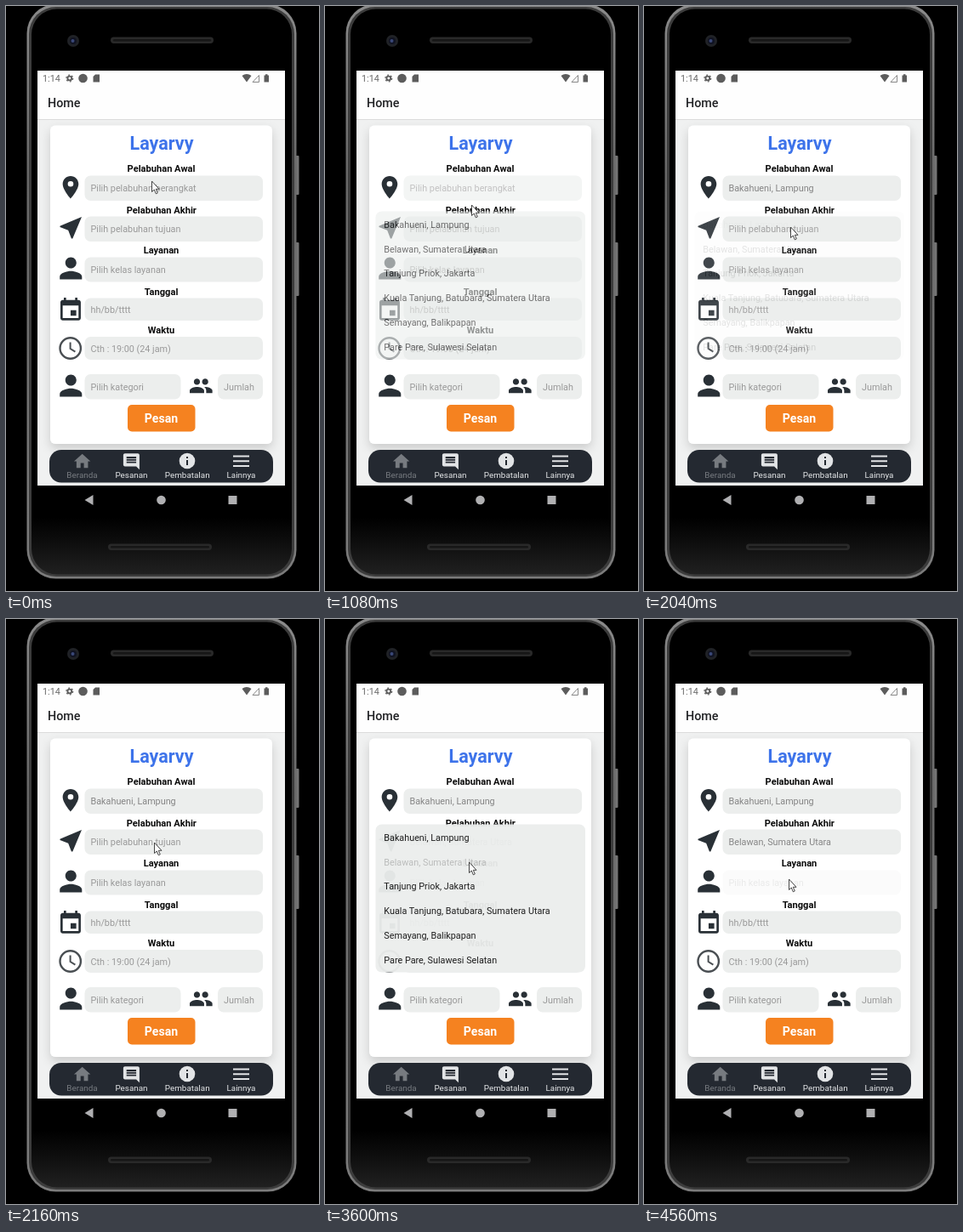
An HTML page that plays this animation: 368 by 688 pixels, repeating every 4800 ms.

```html
<!DOCTYPE html>
<html lang="id">
<head>
<meta charset="utf-8">
<title>Layarvy</title>
<style>
html, body { margin: 0; width: 100%; height: 100%; overflow: hidden; background: #000; }
svg { display: block; width: 368px; height: 688px; font-family: Roboto, "Liberation Sans", sans-serif; }
.mid { text-anchor: middle; }
.label { font-size: 11.1px; font-weight: 700; text-anchor: middle; fill: #0c0c0c; }
.box { fill: #eceeed; }
.hint { font-size: 10.8px; fill: #999; }
.value { font-size: 10.8px; fill: #858585; }
.list text { font-size: 10.8px; fill: #151515; }
.icon { fill: #293036; }
.tab { font-size: 9.9px; fill: #e4e6e8; text-anchor: middle; }
.tabicon { fill: #e2e4e6; }
.off { fill: #777b80; }

/* 2.5% is one 120 ms step */
.anim { animation: 4.8s step-end infinite; }
#cursor { animation-name: cursor; }
#list { animation-name: list; }
#item1 { animation-name: item1; }
#item2 { animation-name: item2; }
#field1 { animation-name: field1; }
#field2 { animation-name: field2; }
#field3 { animation-name: field3; }
#hint1 { animation-name: hide1; }
#value1 { animation-name: show1; }
#hint2 { animation-name: hide2; }
#value2 { animation-name: show2; }

@keyframes cursor {
  0% { transform: translate(171px, 206px); }
  2.5% { transform: translate(172px, 212px); }
  5% { transform: translate(173px, 218px); }
  7.5% { transform: translate(173px, 223px); }
  20% { transform: translate(173px, 228px); }
  22.5% { transform: translate(172px, 234px); }
  25% { transform: translate(172px, 240px); }
  27.5% { transform: translate(169px, 247px); }
  30% { transform: translate(167px, 253px); }
  40% { transform: translate(169px, 256px); }
  42.5% { transform: translate(172px, 260px); }
  45% { transform: translate(174px, 263px); }
  47.5% { transform: translate(173px, 263px); }
  57.5% { transform: translate(171px, 275px); }
  60% { transform: translate(169px, 288px); }
  62.5% { transform: translate(167px, 298px); }
  65% { transform: translate(168px, 292px); }
  67.5%, 75% { transform: translate(169px, 286px); }
  77.5% { transform: translate(169px, 291px); }
  80% { transform: translate(169px, 299px); }
  82.5%, 100% { transform: translate(170px, 306px); }
}
@keyframes list {
  0% { opacity: 0; }
  20% { opacity: .08; }
  22.5% { opacity: .6; }
  25% { opacity: 1; }
  37.5% { opacity: .96; }
  40% { opacity: .55; }
  42.5% { opacity: .12; }
  45% { opacity: 0; }
  62.5% { opacity: .08; }
  65% { opacity: .6; }
  67.5% { opacity: 1; }
  75% { opacity: .96; }
  77.5% { opacity: .55; }
  80% { opacity: .12; }
  82.5%, 100% { opacity: 0; }
}
@keyframes item1 { 0% { opacity: 1; } 35% { opacity: .2; } 45%, 100% { opacity: 1; } }
@keyframes item2 { 0% { opacity: 1; } 72.5% { opacity: .5; } 75% { opacity: .24; } 82.5%, 100% { opacity: 1; } }
@keyframes field1 {
  0% { opacity: 1; } 15% { opacity: .5; } 17.5% { opacity: .2; }
  22.5% { opacity: .6; } 25%, 100% { opacity: 1; }
}
@keyframes field2 {
  0% { opacity: 1; } 55% { opacity: .5; } 57.5% { opacity: .2; }
  65% { opacity: .6; } 67.5%, 100% { opacity: 1; }
}
@keyframes field3 { 0% { opacity: 1; } 92.5% { opacity: .5; } 95%, 100% { opacity: .2; } }
@keyframes hide1 { 0% { opacity: 1; } 37.5%, 100% { opacity: 0; } }
@keyframes show1 { 0% { opacity: 0; } 37.5%, 100% { opacity: 1; } }
@keyframes hide2 { 0% { opacity: 1; } 75%, 100% { opacity: 0; } }
@keyframes show2 { 0% { opacity: 0; } 75%, 100% { opacity: 1; } }
</style>
</head>
<body>
<svg viewBox="0 0 368 688">
  <defs>
    <linearGradient id="rim" x2="0" y2="1">
      <stop offset="0" stop-color="#8a8a8a"/>
      <stop offset=".3" stop-color="#686868"/>
      <stop offset="1" stop-color="#7c7c7c"/>
    </linearGradient>
    <linearGradient id="glass" x2="0" y2="1">
      <stop offset=".9" stop-color="#000"/>
      <stop offset="1" stop-color="#202020"/>
    </linearGradient>
    <filter id="shade" x="-15%" y="-10%" width="130%" height="125%">
      <feDropShadow dx="0" dy="5" stdDeviation="6" flood-opacity=".16"/>
    </filter>
    <clipPath id="screen"><rect x="37" y="76" width="291" height="488"/></clipPath>
    <path id="person" d="M12 12c2.21 0 4-1.79 4-4s-1.79-4-4-4-4 1.79-4 4 1.79 4 4 4zm0 2c-2.67 0-8 1.34-8 4v2h16v-2c0-2.66-5.33-4-8-4z"/>
  </defs>

  <!-- phone -->
  <rect width="368" height="688"/>
  <g fill="#747474">
    <rect x="340" y="176" width="4.5" height="46" rx="1"/>
    <rect x="340" y="278" width="4.5" height="63" rx="1"/>
  </g>
  <rect x="24.5" y="-2" width="317" height="675.5" rx="34" fill="url(#rim)"/>
  <rect x="27" y="1" width="312" height="670" rx="32" fill="#3c3c3c"/>
  <rect x="30" y="3.5" width="306" height="665" rx="30" fill="url(#glass)"/>
  <rect x="123" y="36.5" width="121" height="7.5" rx="3.7" fill="#292929"/>
  <rect x="126" y="39" width="115" height="2.5" rx="1.2" fill="#161616"/>
  <rect x="120" y="632.5" width="122" height="7.5" rx="3.7" fill="#292929"/>
  <rect x="123" y="635" width="116" height="2.5" rx="1.2" fill="#161616"/>
  <circle cx="79" cy="41" r="7" fill="#202226"/>
  <circle cx="79" cy="41" r="4" fill="#101322"/>
  <circle cx="78.5" cy="41" r="2" fill="#3a4878"/>

  <g clip-path="url(#screen)">
    <rect x="37" y="76" width="291" height="488" fill="#f0f1f1"/>
    <rect x="37" y="76" width="291" height="57" fill="#fefefe"/>
    <path d="M37 133.5H328" stroke="#dcdcdc"/>

    <!-- status bar -->
    <text x="43" y="89" font-size="10.8" fill="#666">1:14</text>
    <g fill="#5c5c5c">
      <circle cx="74.8" cy="85" r="2.4" fill="none" stroke="#5c5c5c" stroke-width="1.9"/>
      <circle cx="74.8" cy="85" r="3.9" fill="none" stroke="#5c5c5c" stroke-width="1.3" stroke-dasharray="1.8 2.284"/>
      <circle cx="90.5" cy="85" r="5.3"/>
      <path d="M105 80.5h5v9h-7.5v-6.5z"/>
      <path d="M277.5 82q5.500-3.800 11 0L283 89.5z"/>
      <path d="M290 89.5h7.500v-8z" fill="none" stroke="#888"/>
      <path d="M303.500 81.500h1.500v-1.200h2.500v1.200h1.500v8h-5.500z"/>
    </g>
    <text x="49" y="119" font-size="14.3" font-weight="500" fill="#202124">Home</text>

    <!-- form -->
    <rect x="52" y="140.5" width="261" height="374.5" rx="6" fill="#fff" filter="url(#shade)"/>
    <text class="mid" x="183" y="168.7" font-size="21.5" font-weight="700" fill="#3d73ea">Layarvy</text>
    <g class="label">
      <text x="182.5" y="195">Pelabuhan Awal</text>
      <text x="182.8" y="243.5">Pelabuhan Akhir</text>
      <text x="182.5" y="291">Layanan</text>
      <text x="182.5" y="339.5">Tanggal</text>
      <text x="182.5" y="385">Waktu</text>
    </g>

    <g class="icon">
      <path transform="translate(60 197.3) scale(1.33)" d="M12 2C8.130 2 5 5.130 5 9c0 5.250 7 13 7 13s7-7.750 7-13c0-3.870-3.130-7-7-7zm0 9.500a2.500 2.500 0 1 1 0-5 2.500 2.500 0 0 1 0 5z"/>
      <path transform="translate(89 248) rotate(45) scale(1.4)" d="M0 0L-7.500 18.290l.710.710L0 16l6.790 3 .710-.710z"/>
      <use href="#person" transform="translate(56.7 289) scale(1.63)"/>
      <path transform="translate(60 341.7) scale(1.33)" d="M17 12h-5v5h5v-5zM16 1v2H8V1H6v2H5c-1.110 0-1.990.900-1.990 2L3 19c0 1.100.890 2 2 2h14c1.100 0 2-.900 2-2V5c0-1.100-.900-2-2-2h-1V1h-2zm3 18H5V8h14v11z"/>
      <g fill="none" stroke="#4a4f53">
        <circle cx="75.700" cy="402.500" r="12.200" stroke-width="2.400"/>
        <path d="M75.600 395.500v7.500l5.800 3.600" stroke-width="2"/>
      </g>
      <use href="#person" transform="translate(56.7 427) scale(1.63)"/>
      <path transform="translate(214.8 432.2) scale(1.21)" d="M16 11c1.660 0 2.990-1.340 2.990-3S17.660 5 16 5s-3 1.340-3 3 1.340 3 3 3zm-8 0c1.660 0 2.990-1.340 2.990-3S9.660 5 8 5 5 6.340 5 8s1.340 3 3 3zm0 2c-2.330 0-7 1.170-7 3.500V19h14v-2.500c0-2.330-4.670-3.500-7-3.500zm8 0c-.290 0-.620.020-.970.050 1.160.840 1.970 1.970 1.970 3.450V19h6v-2.500c0-2.330-4.670-3.500-7-3.500z"/>
    </g>

    <g id="field1" class="anim">
      <rect class="box" x="92.5" y="199.5" width="209.5" height="29.5" rx="7"/>
      <text id="hint1" class="hint anim" x="99.5" y="218.3">Pilih pelabuhan berangkat</text>
      <text id="value1" class="value anim" x="99.5" y="218.3">Bakahueni, Lampung</text>
    </g>
    <g id="field2" class="anim">
      <rect class="box" x="92.5" y="247.5" width="209.5" height="29.5" rx="7"/>
      <text id="hint2" class="hint anim" x="99.5" y="266.3">Pilih pelabuhan tujuan</text>
      <text id="value2" class="value anim" x="99.5" y="266.3">Belawan, Sumatera Utara</text>
    </g>
    <g id="field3" class="anim">
      <rect class="box" x="92.5" y="295.5" width="209.5" height="29" rx="7"/>
      <text class="hint" x="99.5" y="314.3">Pilih kelas layanan</text>
    </g>
    <rect class="box" x="92.5" y="343.5" width="209.5" height="26.5" rx="7"/>
    <text class="hint" x="99.5" y="361">hh/bb/tttt</text>
    <rect class="box" x="92.5" y="389" width="209.5" height="27" rx="7"/>
    <text class="hint" x="99.5" y="406.5">Cth : 19:00 (24 jam)</text>
    <rect class="box" x="92.5" y="433" width="113" height="29.5" rx="7"/>
    <text class="hint" x="99.5" y="452">Pilih kategori</text>
    <rect class="box" x="249" y="433" width="53" height="29.5" rx="7"/>
    <text class="hint" x="256" y="452">Jumlah</text>

    <rect x="143" y="469" width="79.5" height="31.5" rx="5" fill="#f58220"/>
    <text class="mid" x="182.5" y="490" font-size="14.1" font-weight="700" fill="#fff">Pesan</text>

    <!-- tab bar -->
    <rect x="51" y="522" width="263" height="38.5" rx="14" fill="#242931"/>
    <g class="tabicon">
      <path class="off" transform="translate(78 523.8) scale(.97)" d="M10 20v-6h4v6h5v-8h3L12 3 2 12h3v8z"/>
      <path transform="translate(136 524.3) scale(.95)" d="M22 4c0-1.100-.900-2-2-2H4c-1.100 0-2 .900-2 2v12c0 1.100.900 2 2 2h14l4 4zM18 14H6v-2h12zm0-3H6V9h12zm0-3H6V6h12z"/>
      <circle cx="213" cy="535" r="9.3"/>
      <path d="M213 534v6M213 530v2" stroke="#242931" stroke-width="2"/>
      <path d="M267 529.5h19M267 535.3h19M267 541h19" stroke="#e2e4e6" stroke-width="2"/>
    </g>
    <g class="tab">
      <text class="off" x="89.5" y="555">Beranda</text>
      <text x="147.5" y="555">Pesanan</text>
      <text x="213.2" y="555">Pembatalan</text>
      <text x="276.5" y="555">Lainnya</text>
    </g>

    <g id="list" class="list anim">
      <rect class="box" x="59.5" y="241.5" width="246.5" height="174" rx="7"/>
      <text id="item1" class="anim" x="69.3" y="260.5">Bakahueni, Lampung</text>
      <text id="item2" class="anim" x="69.3" y="289.5">Belawan, Sumatera Utara</text>
      <text x="69.3" y="318.3">Tanjung Priok, Jakarta</text>
      <text x="69.3" y="347.3">Kuala Tanjung, Batubara, Sumatera Utara</text>
      <text x="69.3" y="376.3">Semayang, Balikpapan</text>
      <text x="69.3" y="405.3">Pare Pare, Sulawesi Selatan</text>
    </g>
  </g>

  <!-- system buttons -->
  <g fill="#b0b0b2">
    <path d="M92.5 581l10-6v12z"/>
    <circle cx="182.5" cy="581" r="5.3"/>
    <rect x="261.5" y="576" width="10" height="10"/>
  </g>

  <g id="cursor" class="anim">
    <path d="M.5 0V12.5L3.3 10l2 4.8 2-.9-2-4.6H9z" fill="#fff" stroke="#333" stroke-width=".9"/>
  </g>
</svg>
</body>
</html>
```
